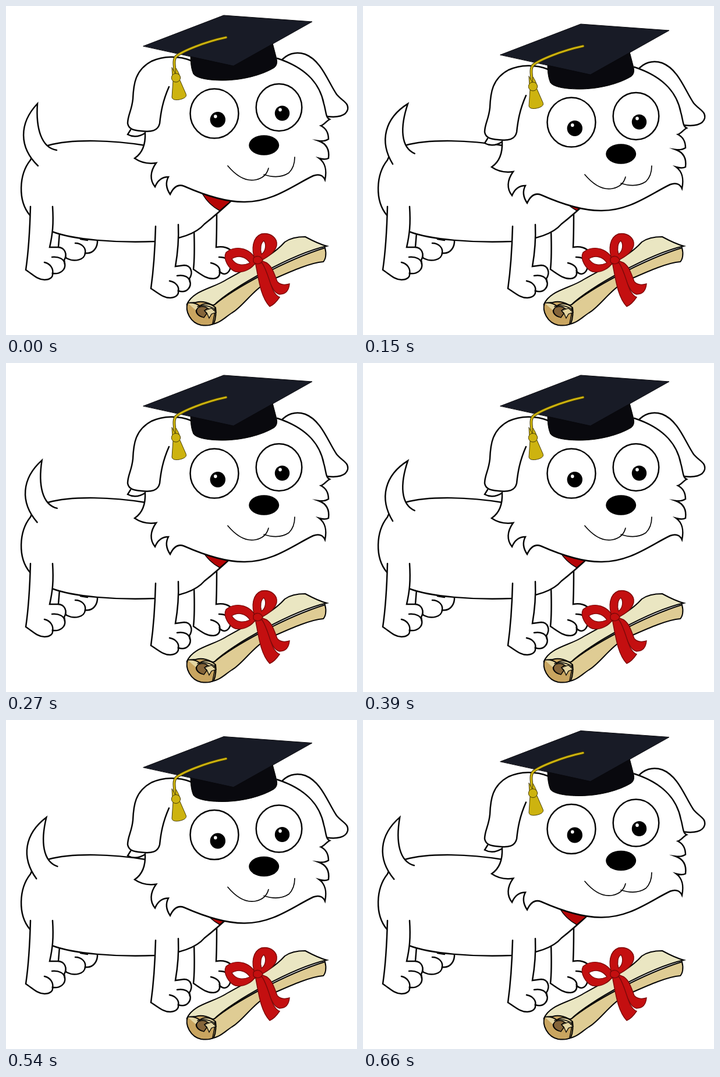
Recreate the animation shown at these times as an HTML page with a canvas. Size 603x566 px, loop 690 ms.

```html
<!DOCTYPE html>
<html lang="en">
<head>
<meta charset="utf-8">
<title>Graduate dog</title>
<style>
  html, body { margin: 0; width: 100%; height: 100%; overflow: hidden; background: #fff; }
  canvas { display: block; }
</style>
</head>
<body>
<canvas id="stage" width="603" height="566"></canvas>
<script>
const ctx = document.getElementById('stage').getContext('2d');
const FRAME = 30, FRAMES = 23;
const INK = '#050505', WHITE = '#fff', GOLD = '#cdb30f', RED = '#c40f10';

// Keys are [frame, value] pairs joined by straight tweens.
const headKeys = [[0, 0], [5, 15], [11, 0], [17, 15], [23, 0]];
const tailKeys = [[0, 0], [5, 14.6], [11, 0], [13, 14.6], [16, 0], [19, 14.6], [24, 0]];

function tween(keys, frame) {
  const i = keys.findIndex(key => key[0] > frame);
  const [f0, v0] = keys[i - 1], [f1, v1] = keys[i];
  return v0 + (v1 - v0) * (frame - f0) / (f1 - f0);
}

function shape(d, fill, stroke = INK, width = 2.5) {
  const path = new Path2D(d);
  if (fill) { ctx.fillStyle = fill; ctx.fill(path); }
  if (stroke) { ctx.strokeStyle = stroke; ctx.lineWidth = width; ctx.stroke(path); }
}

const line = (d, width) => shape(d, null, INK, width);

function oval(x, y, rx, ry, fill, stroke, width = 2.5) {
  ctx.beginPath();
  ctx.ellipse(x, y, rx, ry, 0, 0, Math.PI * 2);
  ctx.fillStyle = fill;
  ctx.fill();
  if (stroke) { ctx.strokeStyle = stroke; ctx.lineWidth = width; ctx.stroke(); }
}

function drawFarLegs() {
  shape('M92 390L90 415L104 434C118 441 135 437 136 425C150 427 158 415 157 402', WHITE);
  line('M119 408C130 408 138 416 136 426M128 401L140 403');
  shape('M323 386C324 415 324 435 322 453C335 462 345 470 357 469C365 468 368 463 367 457' +
        'C378 467 386 456 386 445L390 425C384 415 372 413 361 415C362 395 362 375 362 355', WHITE);
  line('M352 442C362 444 369 450 367 459M366 432C378 432 384 437 386 445');
}

function drawBody() {
  shape('M240 240C185 231 115 228 72 240C55 247 46 254 42 265C22 290 20 335 41 360L79 388' +
        'C115 402 190 408 257 405C295 402 325 394 341 375C355 364 371 350 386 336', WHITE);
  shape('M334 318C344 337 354 345 367 352L388 334Z', '#b50506', null);
  line('M338 324C346 338 356 346 367 352L386 336', 1.5);
}

function drawNearLegs() {
  shape('M42 345C41 385 39 420 34 454C45 461 54 471 66 471C76 471 81 466 80 460' +
        'C93 462 103 454 101 443L100 437C106 427 101 415 89 415L75 415C80 393 82 375 80 345', WHITE);
  line('M66 441C76 443 82 452 80 461M79 432C91 431 100 435 101 444');
  shape('M257 379C256 420 254 450 249 486C262 494 271 503 283 502C293 501 297 496 296 490' +
        'C311 495 319 483 316 473L315 469C322 459 318 446 306 446L291 448C295 425 297 400 296 376', WHITE);
  line('M281 473C292 475 298 483 296 491M294 464C306 462 315 466 316 475');
}

function drawTail(angle) {
  ctx.save();
  ctx.translate(65, 258);
  ctx.rotate(angle * Math.PI / 180);
  ctx.translate(-65, -258);
  shape('M55 275C22 243 22 202 54 168C51 211 61 244 87 248', WHITE);
  ctx.restore();
}

function drawFace() {
  oval(358, 185, 41.5, 42.5, WHITE, INK);
  oval(469, 174.5, 39.3, 40.5, WHITE, INK);
  oval(363.8, 195.5, 13.2, 13.5, '#000');
  oval(474.5, 184.5, 12.7, 13, '#000');
  oval(359.8, 190, 2.8, 3, WHITE);
  oval(471, 178.5, 2.8, 3, WHITE);
  oval(443.2, 239.5, 26, 17.3, '#000');
  line('M381 275C397 294 414 302 429 299C443 296 449 287 451 279', 1.7);
  line('M443 290C464 297 477 293 486 287C494 279 496 269 496 260', 1.7);
}

function drawCap() {
  shape('M317 84C317 97 318 108 322 117C328 125 350 128 372 128C405 128 440 119 461 106' +
        'C467 101 466 94 464 87L458 64Z', '#09090e', '#000', 1);
  shape('M236 69L374 16L526 27L391 103Z', '#181b26', '#08080c', 1);
  const cord = 'M378 54C340 62 303 78 293 86C286 92 290 106 291 118';
  shape(cord, null, '#3d3508', 5);
  shape(cord, null, GOLD, 3.2);
  shape('M285 106L286 122L299 122C297 115 294 110 292 107L291 116Z', GOLD, '#4a4009', 1);
  shape('M287 128L285 157C286 163 296 162 302 160C308 158 311 155 309 151L299 128Z', GOLD, '#4a4009', 1);
  oval(292, 123.5, 7.7, 7.5, GOLD, '#4a4009', 1);
}

function drawHead(drop) {
  ctx.save();
  ctx.translate(0, drop);
  shape('M472 95C482 83 497 77 514 83C542 94 553 130 568 152C578 164 589 166 587 178' +
        'C584 190 568 192 552 190', WHITE);
  shape('M214 213L209 221C220 227 231 224 240 218', WHITE);
  shape('M239 218C240 239 233 254 221 262C231 269 244 272 258 270C247 285 247 300 256 311' +
        'C261 299 268 294 279 294C273 305 276 315 282 324C288 311 296 306 306 310' +
        'C340 325 375 337 408 337C458 338 494 308 528 292C538 288 545 292 548 299' +
        'C551 284 550 271 538 262C545 264 550 264 554 262C556 247 551 237 537 232' +
        'C545 233 551 231 554 229C554 217 549 210 541 206C547 204 550 198 556 195' +
        'C549 192 550 181 546 168C540 138 521 108 466 90', WHITE);
  shape('M318 94C296 85 270 86 250 95C222 110 219 134 218 160C216 180 209 188 209 202' +
        'C211 212 219 214 232 215C250 217 261 215 264 202C266 183 269 164 280 139', WHITE);
  drawFace();
  drawCap();
  ctx.restore();
}

function drawScroll() {
  shape('M322 510L358 514C390 487 480 437 548 416C551 427 549 436 545 440' +
        'C519 442 480 461 450 474C424 489 405 519 388 528C374 537 368 547 345 549Z', '#dfcc94', INK, 2);
  shape('M311 513C321 489 356 486 380 470C420 447 457 431 479 406C490 398 503 397 514 397' +
        'C527 404 539 410 551 413C493 426 387 485 358 514C343 517 326 508 311 513Z', '#eae6c2', INK, 2);
  shape('M312 511C307 525 317 545 335 549C343 550 352 550 357 546C361 537 361 525 360 519' +
        'C350 510 337 507 326 510Z', '#c9a560', INK, 2);
  shape('M312 511C319 510 326 511 333 516C341 509 355 513 360 520L354 526C346 517 336 516 329 521' +
        'C322 526 332 535 339 535', '#e4d5a2', INK, 1.7);
  shape('M329 517C339 513 350 516 360 522L355 546', null, INK, 1.5);
  shape('M329 520C333 516 342 516 346 520L341 524L345 529L340 536C329 533 325 526 329 520Z', '#85653a', INK, 1.4);
  shape('M341 524L353 520L361 527L353 530L349 537L345 528Z', '#e4d5a2', INK, 1.3);
}

function drawBow() {
  const edge = '#7d0909';
  const ribbon = d => shape(d, RED, edge, 1.4);
  ribbon('M436 438C455 440 459 455 466 474C471 480 480 480 487 478C486 489 481 496 470 496' +
         'C456 493 454 470 439 448Z');
  ribbon('M428 440C434 470 437 500 453 517C458 515 464 510 470 501C454 494 454 464 440 442Z');
  ribbon('M430 440C424 418 396 409 378 424C372 435 383 453 394 457C410 460 423 451 430 440Z');
  shape('M388 435C399 428 412 431 419 442C408 447 395 447 388 435Z', WHITE, edge, 1.3);
  ribbon('M428 437C421 419 423 398 439 392C455 389 467 400 465 412C462 426 444 435 432 441Z');
  shape('M439 427C436 417 438 407 443 404C448 410 446 422 439 427Z', WHITE, edge, 1.3);
  ribbon('M425 434C430 428 438 430 441 437C439 444 430 446 425 440Z');
}

function draw(frame) {
  ctx.fillStyle = WHITE;
  ctx.fillRect(0, 0, 603, 566);
  ctx.lineCap = 'round';
  ctx.lineJoin = 'miter';
  drawFarLegs();
  drawBody();
  drawNearLegs();
  drawTail(tween(tailKeys, frame));
  drawHead(tween(headKeys, frame));
  drawScroll();
  drawBow();
}

const start = performance.now();
function tick() {
  draw(Math.floor((performance.now() - start) / FRAME) % FRAMES);
  requestAnimationFrame(tick);
}
tick();
</script>
</body>
</html>
```
